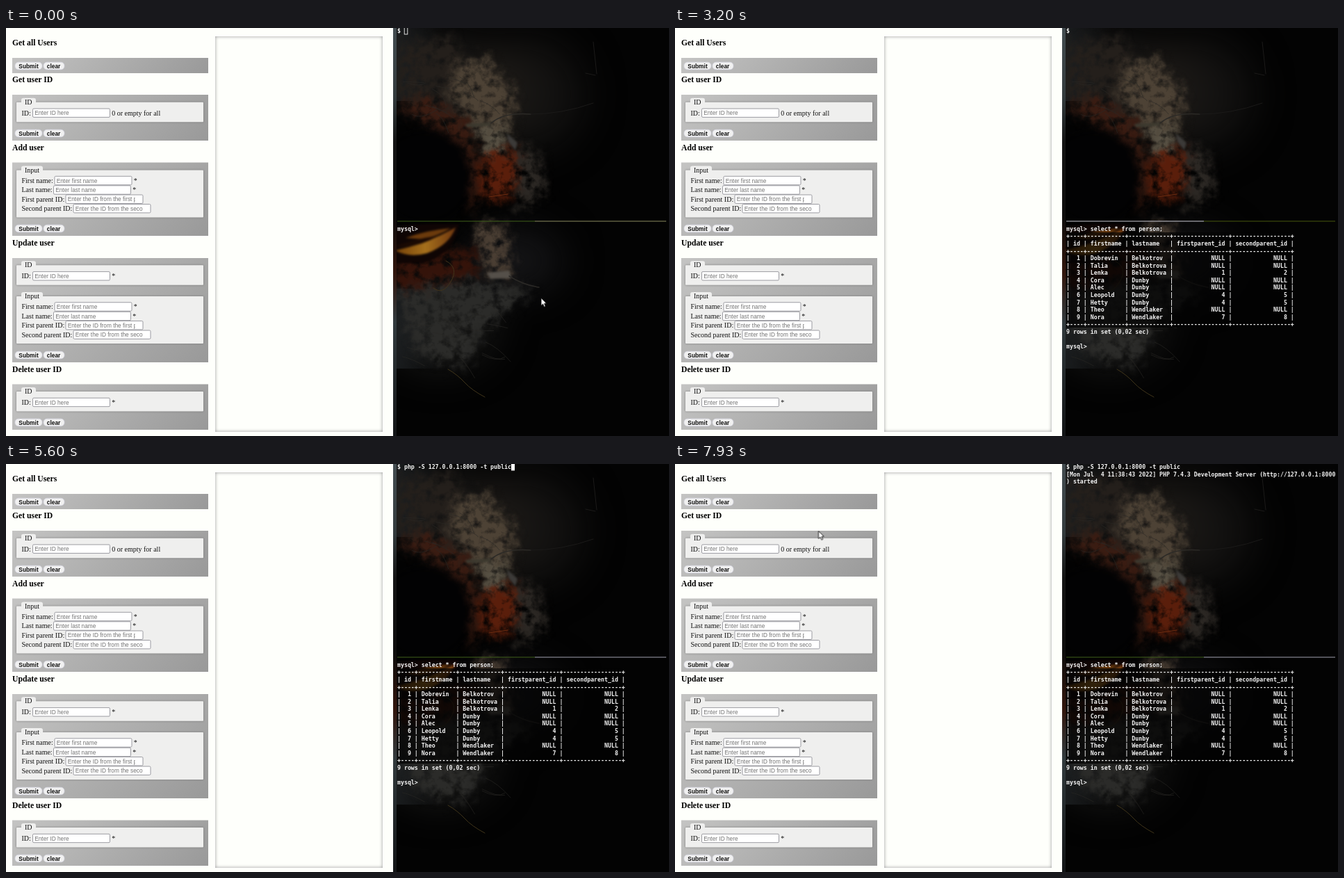
Write an HTML page that moves like this. It is 954 by 587 pixels and loops after 8 s.

```html
<!DOCTYPE html>
<html lang="en">
<head>
<meta charset="utf-8">
<title>User forms and terminal</title>
<style>
html, body { margin: 0; width: 100%; height: 100%; overflow: hidden; background: #fefffb; }
svg { position: absolute; left: 0; top: 0; display: block; }
.panel { position: absolute; left: 301px; top: 12px; width: 241px; height: 569px; box-shadow: inset 0 0 5px #999; }
text { white-space: pre; }
filter { color-interpolation-filters: sRGB; }
.body, .head { font: 10px "Liberation Serif", serif; fill: #111; }
.head { font-size: 11.7px; font-weight: bold; fill: #000; }
.hint { font: 8.3px "Liberation Sans", sans-serif; fill: #757575; }
.label { font: bold 8.4px "Liberation Sans", sans-serif; fill: #111; }
.set { fill: #efefee; filter: drop-shadow(0 0 1.5px #777); }
.tab { fill: #efefee; }
.input { fill: #fff; stroke: #85858c; stroke-width: .8; }
.button { fill: #f1f1f1; stroke: #d6d6e2; stroke-width: .7; }
.term { font: bold 8.25px "DejaVu Sans Mono", monospace; fill: #f4f4f4; }

.step { animation: 8s step-end infinite; }
.left { stroke: #40601a; animation-name: left; }
.right { stroke: #8c8c60; animation-name: right; }
.hollow { animation-name: hollow; }
.caret { animation-name: caret; }
.query { animation-name: query; }
.result { animation-name: result; }
.command { animation-name: command; }
.server { animation-name: server; }
.arrow { animation-name: arrow; }
.pointer { animation: pointer 8s linear infinite; }

@keyframes left { 0%, 55% { stroke: #40601a } 10% { stroke: #c9c9d2 } }
@keyframes right { 0% { stroke: #8c8c60 } 10% { stroke: #49580f } 55% { stroke: #a2a2b0 } }
@keyframes hollow { 0% { opacity: 1 } 10%, 100% { opacity: 0 } }
@keyframes query { 0% { opacity: 0 } 19.1%, 100% { opacity: 1 } }
@keyframes result { 0% { opacity: 0 } 29.1%, 100% { opacity: 1 } }
@keyframes command { 0% { opacity: 0 } 68.4%, 100% { opacity: 1 } }
@keyframes server { 0% { opacity: 0 } 76.6%, 100% { opacity: 1 } }
@keyframes arrow { 0%, 45%, 92.5% { opacity: 1 } 19.1%, 68.4% { opacity: 0 } 100% { opacity: 1 } }
@keyframes caret {
  0% { transform: translate(597.8px, 283.7px); opacity: 0 }
  10% { transform: translate(597.8px, 283.7px); opacity: 1 }
  17.5% { transform: translate(597.8px, 283.7px); opacity: 0 }
  19.1% { transform: translate(702.1px, 283.7px); opacity: 1 }
  29.1% { transform: translate(597.8px, 452.7px); opacity: 1 }
  36.6% { transform: translate(597.8px, 452.7px); opacity: 0 }
  44.1% { transform: translate(597.8px, 452.7px); opacity: 1 }
  51.6% { transform: translate(597.8px, 452.7px); opacity: 0 }
  55% { transform: translate(572.9px, -1.3px); opacity: 1 }
  62.5% { transform: translate(572.9px, -1.3px); opacity: 0 }
  68.4% { transform: translate(726.9px, -1.3px); opacity: 1 }
  76.6% { transform: translate(563px, 30.4px); opacity: 1 }
  84.1% { transform: translate(563px, 30.4px); opacity: 0 }
  91.6% { transform: translate(563px, 30.4px); opacity: 1 }
  99%, 100% { transform: translate(563px, 30.4px); opacity: 0 }
}
@keyframes pointer {
  0%, .9% { transform: translate(770px, 388.5px); animation-timing-function: ease-in-out }
  10.9%, 45% { transform: translate(745px, 383.5px); animation-timing-function: ease-in-out }
  55% { transform: translate(700px, 120px) }
  61%, 92.5% { transform: translate(688px, 125px); animation-timing-function: ease-in-out }
  99%, 100% { transform: translate(206.5px, 96.5px) }
}
</style>
</head>
<body>
<div class="panel"></div>
<svg width="954" height="587" viewBox="0 0 954 587">
  <defs>
    <linearGradient id="edge" x1="0" y1="0" x2="0" y2="1">
      <stop stop-color="#434c50"/><stop offset=".17" stop-color="#343b3d"/>
      <stop offset=".28" stop-color="#141414"/><stop offset=".46" stop-color="#0e0d0d"/>
      <stop offset=".6" stop-color="#32160d"/><stop offset=".72" stop-color="#333b3e"/>
      <stop offset="1" stop-color="#121416"/>
    </linearGradient>
    <linearGradient id="mist">
      <stop stop-color="#23272a"/><stop offset="1" stop-color="#23272a" stop-opacity="0"/>
    </linearGradient>
    <linearGradient id="ember">
      <stop stop-color="#744008"/><stop offset=".5" stop-color="#a56f1c"/><stop offset="1" stop-color="#6e360e"/>
    </linearGradient>
    <filter id="haze" x="-60%" y="-60%" width="220%" height="220%"><feGaussianBlur stdDeviation="28"/></filter>
    <filter id="soft" x="-60%" y="-60%" width="220%" height="220%"><feGaussianBlur stdDeviation="7"/></filter>
    <filter id="fine" x="-30%" y="-30%" width="160%" height="160%"><feGaussianBlur stdDeviation="1.4"/></filter>
    <filter id="rock" x="-30%" y="-30%" width="160%" height="160%">
      <feGaussianBlur in="SourceGraphic" stdDeviation="7" result="blur"/>
      <feTurbulence type="fractalNoise" baseFrequency=".07" numOctaves="4" seed="4" result="noise"/>
      <feDisplacementMap in="blur" in2="noise" scale="26" xChannelSelector="R" yChannelSelector="G" result="rough"/>
      <feColorMatrix in="noise" values="0 0 0 0 0  0 0 0 0 0  0 0 0 0 0  0 0 2.6 0 -.45"/>
      <feComposite in="rough" operator="in"/>
    </filter>
    <clipPath id="screen"><path d="M557 0H954V587H557Z"/></clipPath>
  </defs>

  <g id="forms"></g>

  <g clip-path="url(#screen)">
    <path fill="#030303" d="M557 0H954V587H557Z"/>
    <g filter="url(#haze)">
      <ellipse cx="750" cy="95" rx="80" ry="80" fill="#131211"/>
      <ellipse cx="690" cy="90" rx="60" ry="70" fill="#1d1a17"/>
      <ellipse cx="610" cy="55" rx="70" ry="55" fill="#171615"/>
      <ellipse cx="730" cy="335" rx="70" ry="45" fill="#151517"/>
      <ellipse cx="625" cy="425" rx="80" ry="65" fill="#171716"/>
    </g>
    <path fill="url(#mist)" opacity=".7" d="M557 0H625V105H557ZM557 375H625V490H557Z"/>
    <g filter="url(#rock)">
      <path fill="#241f1b" d="M562 20L650 15L670 110L640 135L562 100Z"/>
      <path fill="#4d4235" d="M648 52L692 40L734 98L726 150L690 178L664 130L638 90Z"/>
      <path fill="#575144" d="M682 140L722 145L715 178L694 184Z"/>
      <path fill="#5a1e0b" d="M688 182L738 172L742 220L715 252L680 240Z"/>
      <path fill="#2b2723" d="M735 165L770 180L775 240L735 265Z"/>
      <path fill="#3a1c12" d="M560 108L610 100L662 130L684 200L670 275L655 170L590 128Z"/>
      <path fill="#4a3e33" d="M672 280L718 284L728 360L690 350Z"/>
      <path fill="#34130a" d="M557 330L620 325L675 315L680 350L640 385L557 380Z"/>
      <path fill="#2b2b29" d="M560 380L660 360L760 375L690 430L660 490L590 470Z"/>
    </g>
    <circle cx="602" cy="214" r="66" fill="#020203" filter="url(#soft)"/>
    <g filter="url(#fine)">
      <path fill="#0f0504" d="M557 286Q600 280 652 282Q645 325 600 338L557 338Z"/>
      <path fill="url(#ember)" d="M560 320Q604 311 647 287Q638 312 606 324Q580 331 560 320Z"/>
      <path fill="#6b3a0c" d="M575 302Q605 291 640 288Q622 299 600 304Z"/>
      <path fill="#1a0903" d="M557 315Q590 303 622 299Q600 312 575 315Z"/>
      <path fill="#55504a" d="M692 352L724 349L727 360L697 361Z"/>
      <path fill="#3c392f" d="M660 138L696 136L697 140L664 143Z"/>
      <path fill="#3c3a38" d="M720 151L736 165L733 176L724 165Z"/>
    </g>
    <g fill="none" stroke-linecap="round" stroke="#1b1a19">
      <path stroke="#2b2926" stroke-width="1.5" d="M698 137Q716 121 755 124"/>
      <path d="M755 124Q800 124 845 108"/>
      <path stroke="#2b2926" stroke-width="1.5" d="M724 357Q745 370 767 373"/>
      <path d="M845 20L850 66M834 65L848 68"/>
      <path stroke="#40351a" d="M636 491Q650 499 660 510T689 531"/>
      <path stroke="#6d2c10" d="M695 243L722 239"/>
      <path stroke="#40331a" d="M633 335Q652 345 640 365T615 374"/>
    </g>
    <g id="scratches" fill="none" stroke="#2a2926" stroke-width=".6"></g>
    <path fill="url(#edge)" d="M557 0H562V587H557Z"/>

    <path class="step result" fill="#030303" fill-opacity=".72" d="M563 294H890V431H563Z"/>
    <path class="step left" d="M563 278H761"/>
    <path class="step right" d="M761 278H950"/>
    <g class="term">
      <g id="base"></g>
      <g id="query" class="step query"></g>
      <g id="result" class="step result"></g>
      <g id="command" class="step command"></g>
      <g id="server" class="step server"></g>
    </g>
    <rect class="step hollow" x="573.2" y="-1" width="4.6" height="10" fill="none" stroke="#eee" stroke-width=".9"/>
    <rect class="step caret" width="5" height="10.5" fill="#fff"/>
  </g>

  <g class="pointer">
    <path class="step arrow" fill="#fff" stroke="#111" stroke-width=".9" d="M0 0V11L2.6 8.7L4.4 12.7L6.3 11.8L4.5 8L7.8 7.7Z"/>
  </g>
</svg>

<script>
const byId = id => document.getElementById(id);
const text = (cls, x, y, s) => `<text class="${cls}" x="${x}" y="${y}">${s.replace('>', '&gt;')}</text>`;
const rect = (cls, x, y, w, h, r = 0) =>
  `<rect class="${cls}" x="${x}" y="${y}" width="${w}" height="${h}" rx="${r}"/>`;

// Forms: every y is the middle of a text row.
let ids = 0;
function field(y, label, x, hint, note) {
  const id = 'clip' + ids++;
  return text('body', 22.5, y + 3.4, label) + rect('input', x, y - 6.2, 111, 12.4, 1.5) +
    `<clipPath id="${id}">${rect('', x, y - 6, 100, 12)}</clipPath>` +
    `<g clip-path="url(#${id})">${text('hint', x + 2.7, y + 3, hint)}</g>` +
    text('body', x + 113.7, y + 3.4, note);
}
function fieldset(y, title, height, tab) {
  return rect('set', 15, y, 269, height, 1) + rect('tab', 22, y - 6, tab, 11, 3) +
    text('body', 27, y + 3, title);
}
const idSet = (y, note) => fieldset(y, 'ID', 28.5, 21) + field(y + 15.5, 'ID:', 38.5, 'Enter ID here', note);
const inputSet = y => fieldset(y, 'Input', 68, 31) +
  field(y + 15, 'First name:', 70, 'Enter first name', '*') +
  field(y + 28.5, 'Last name:', 68.5, 'Enter last name', '*') +
  field(y + 41.7, 'First parent ID:', 86, 'Enter the ID from the first parent', '') +
  field(y + 55.2, 'Second parent ID:', 97, 'Enter the ID from the second parent', '');

// A box shaded at a true 45 degrees, whatever its proportions.
function box(x, y, w, h) {
  const id = 'steel' + ids++, reach = (w + h) / 2;
  return `<linearGradient id="${id}" gradientUnits="userSpaceOnUse" x1="${x}" y1="${y}" x2="${x + reach}" y2="${y + reach}">
    <stop stop-color="#c4c4c3"/><stop offset="1" stop-color="#999"/></linearGradient>
    <rect x="${x}" y="${y}" width="${w}" height="${h}" fill="url(#${id})"/>`;
}
function form(title, top, height, content) {
  const y = top + height - 10.5;
  return text('head', 9, top - 18, title) + box(9, top, 282, height) + content +
    rect('button', 13, y - 5.3, 39, 10.6, 5) + text('label', 18.3, y + 3, 'Submit') +
    rect('button', 54, y - 5.3, 30, 10.6, 5) + text('label', 58.8, y + 3, 'clear');
}
byId('forms').innerHTML =
  form('Get all Users', 43, 22, '') +
  form('Get user ID', 96, 66, idSet(106.7, '0 or empty for all')) +
  form('Add user', 193.5, 105.5, inputSet(204.5)) +
  form('Update user', 331, 150, idSet(341.3, '*') + inputSet(386)) +
  form('Delete user ID', 512.5, 65.5, idSet(523, '*'));

// Terminal: rows counted from the top of each pane.
const LINE = 10.56, COL = 4.967;
const row = (pane, n, s, col = 0) => text('', 563 + col * COL, pane + n * LINE, s);
const TOP = 7, BOTTOM = 291.9;
const rule = '+' + [4, 11, 12, 16, 17].map(n => '-'.repeat(n) + '+').join('');
const record = (id, first, last, a = 'NULL', b = 'NULL') =>
  `| ${id.padStart(2)} | ${first.padEnd(9)} | ${last.padEnd(10)} | ${a.padStart(14)} | ${b.padStart(15)} |`;
const people = [
  ['Dobrevin', 'Belkotrov'], ['Talia', 'Belkotrova'], ['Lenka', 'Belkotrova', '1', '2'],
  ['Cora', 'Dunby'], ['Alec', 'Dunby'], ['Leopold', 'Dunby', '4', '5'],
  ['Hetty', 'Dunby', '4', '5'], ['Theo', 'Wendlaker'], ['Nora', 'Wendlaker', '7', '8']
];
const table = [
  rule, record('id', 'firstname', 'lastname', 'firstparent_id', 'secondparent_id'), rule,
  ...people.map((p, i) => record(String(i + 1), ...p)),
  rule, '9 rows in set (0,02 sec)', '', 'mysql>'
];
byId('base').innerHTML = row(TOP, 0, '$') + row(BOTTOM, 0, 'mysql>');
byId('query').innerHTML = row(BOTTOM, 0, 'select * from person;', 7);
byId('result').innerHTML = table.map((s, i) => row(BOTTOM, i + 1, s)).join('');
byId('command').innerHTML = row(TOP, 0, 'php -S 127.0.0.1:8000 -t public', 2);
byId('server').innerHTML =
  row(TOP, 1, '[Mon Jul  4 11:38:43 2022] PHP 7.4.3 Development Server (http://127.0.0.1:8000') +
  row(TOP, 2, ') started');

// Faint scratches in the wallpaper.
let seed = 7;
const rnd = () => (seed = seed * 16807 % 2147483647) / 2147483647;
let d = '';
for (let i = 0; i < 26; i++) {
  const upper = i % 2;
  const x = 570 + rnd() * 130, y = upper ? 60 + rnd() * 70 : 390 + rnd() * 90;
  d += `M${x} ${y}q${10 + rnd() * 12} ${rnd() * 12} ${18 + rnd() * 20} ${rnd() * 40 - 8}`;
}
byId('scratches').innerHTML = `<path d="${d}"/>`;
</script>
</body>
</html>
```
